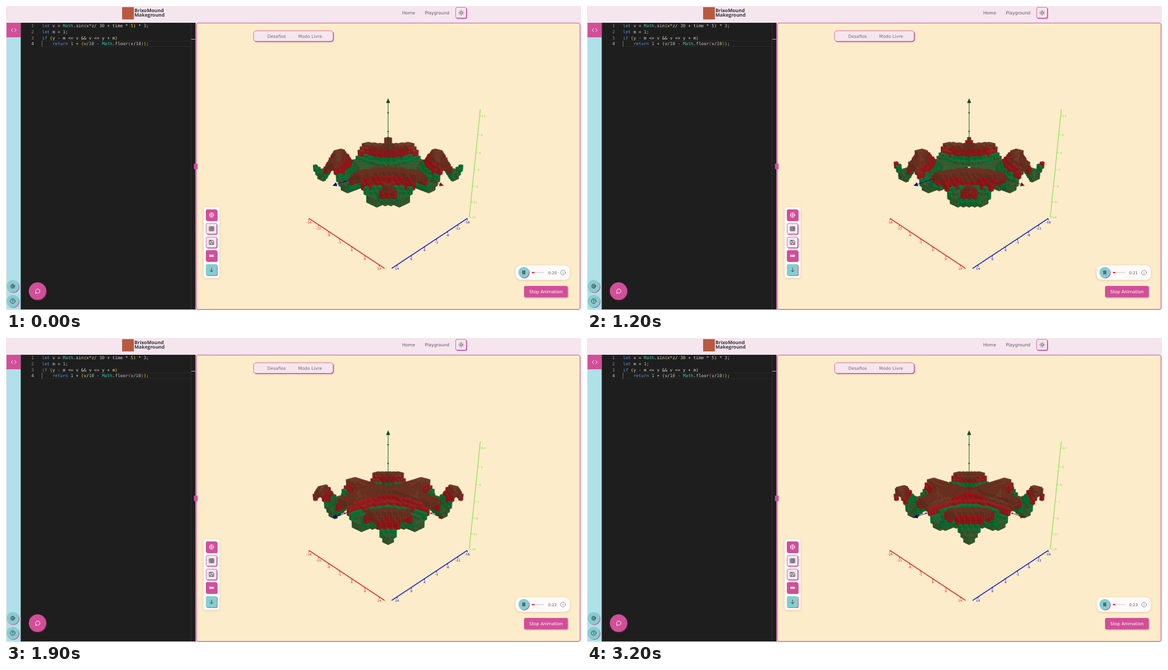
An HTML page with a canvas for the animation above (3.4 s loop, 1030 by 544 pixels).

```html
<!DOCTYPE html>
<html lang="pt">
<head>
<meta charset="utf-8">
<title>Voxel editor</title>
<style>
html, body { margin: 0; width: 100%; height: 100%; overflow: hidden; background: #f5e6ee; }
svg, canvas { position: absolute; left: 0; top: 0; width: 1030px; height: 544px; }
text { font: 7.8px "DejaVu Sans", sans-serif; fill: #5b5862; text-rendering: geometricPrecision; }
.code text { font: 7.76px "DejaVu Sans Mono", monospace; fill: #d4d4d4; white-space: pre; }
.code .num { fill: #858585; text-anchor: end; }
.code .on { fill: #c6c6c6; }
.k { fill: #569cd6; } .t { fill: #3dc9b0; } .n { fill: #b5cea8; } .g { fill: #ffd700; } .p { fill: #da70d6; }
.brand { font: bold 8.6px "Open Sans", sans-serif; fill: #35323c; }
.soft { filter: drop-shadow(0 1px 2px #0002); }
.pink { fill: #d14f98; } .teal { fill: #86cdd0; }
.box { fill: #f5e6ee; stroke: #d14f98; stroke-width: .8; }
.pop { filter: drop-shadow(1.3px 1.3px .6px #c9529a); }
.dark { filter: drop-shadow(1px 1px 1px #7a2d5a99); }
.icon { fill: none; stroke: #3a3640; stroke-width: .9; stroke-linecap: round; stroke-linejoin: round; }
.white { stroke: #fff; }
</style>
</head>
<body>
<svg viewBox="0 0 1030 544">
  <!-- header -->
  <rect x="208" y="2" width="21" height="22" fill="#b85a42"/>
  <text class="brand" x="230" y="11">BrixoMound</text>
  <text class="brand" x="230" y="19.3">Makeground</text>
  <text x="709.7" y="15.2">Home</text>
  <text x="750.3" y="15.2">Playground</text>
  <rect class="box pop" x="805.5" y="2.5" width="19" height="19" rx="2.5"/>
  <g class="icon"><circle cx="815.4" cy="12.2" r="2"/>
    <path d="M815.4 7.6v1M815.4 15.8v1M810.8 12.2h1M819 12.2h1M812.2 9l.7.7M818 14.8l.7.7M812.2 15.4l.7-.7M818 9.6l.7-.7"/></g>

  <!-- side rail -->
  <rect x="1" y="30" width="26" height="513" fill="#b0e0e8"/>
  <rect class="pink" x="1" y="30" width="25.4" height="26"/>
  <path class="icon white" d="M12 40.5l-2.8 2.7 2.8 2.7M15.5 40.5l2.8 2.7-2.8 2.7"/>
  <circle class="teal pop" cx="12" cy="501.5" r="11"/>
  <circle class="teal pop" cx="12" cy="528" r="11"/>
  <g class="icon"><circle cx="12" cy="501.5" r="1.4"/><circle cx="12" cy="501.5" r="3.2"/>
    <circle cx="12" cy="501.5" r="4" stroke-dasharray="1.2 1.94" stroke-linecap="butt"/>
    <circle cx="12" cy="528" r="4.2"/><path d="M10.8 527a1.25 1.25 0 1 1 1.7 1.1q-.5.2-.5.7M12 530.2v.1"/></g>

  <!-- editor -->
  <rect x="26.4" y="30" width="312.6" height="513" fill="#1e1e1e"/>
  <path d="M64 62.5h267M64 72.5h267" stroke="#292929"/>
  <path d="M331.5 31v512" stroke="#343434"/>
  <path d="M64.5 62v11" stroke="#707070"/>
  <path d="M332 59.5h7" stroke="#b8b8b8"/>
  <g class="code">
    <text class="num" x="50" y="38.4">1</text><text class="num" x="50" y="49">2</text>
    <text class="num" x="50" y="59.6">3</text><text class="num on" x="50" y="70.2">4</text>
    <text x="64.5" y="38.4"><tspan class="k">let</tspan> v = <tspan class="t">Math</tspan>.sin<tspan class="g">(</tspan>x*z/ <tspan class="n">30</tspan> + time * <tspan class="n">5</tspan><tspan class="g">)</tspan> * <tspan class="n">3</tspan>;</text>
    <text x="64.5" y="49"><tspan class="k">let</tspan> m = <tspan class="n">1</tspan>;</text>
    <text x="64.5" y="59.6"><tspan class="k">if</tspan> <tspan class="g">(</tspan>y - m &lt;= v &amp;&amp; v &lt;= y + m<tspan class="g">)</tspan></text>
    <text x="64.5" y="70.2">    <tspan class="k">return</tspan> <tspan class="n">1</tspan> + <tspan class="g">(</tspan>v/<tspan class="n">10</tspan> - <tspan class="t">Math</tspan>.floor<tspan class="p">(</tspan>v/<tspan class="n">10</tspan><tspan class="p">)</tspan><tspan class="g">)</tspan>;</text>
  </g>
  <circle class="pink dark" cx="56.5" cy="510.3" r="15.7"/>
  <path class="icon white" d="M53 514.2l.6-2.1a3.8 3.8 0 1 1 1.5 1.5z"/>

  <!-- scene panel -->
  <path d="M339.7 30v514" stroke="#d14f98" stroke-width="1.2"/>
  <rect x="341" y="30.5" width="687.3" height="512.6" rx="4" fill="#fdecc9" stroke="#d14f98" stroke-width="1.1"/>
  <rect class="pink" x="336.7" y="282" width="6.6" height="10" rx="1"/>
  <rect class="box pop" x="443.5" y="44.3" width="142.5" height="18.9" rx="4.5"/>
  <text x="468" y="56.7" style="fill:#716b75">Desafios</text>
  <text x="523.3" y="56.7" style="fill:#716b75">Modo Livre</text>

  <!-- tools -->
  <rect class="soft" x="354" y="360" width="28.5" height="126.5" rx="4" fill="#fffafa"/>
  <g class="pop">
    <rect class="pink" x="358" y="364" width="20" height="20" rx="2.5"/>
    <rect class="box" x="358.5" y="389" width="19" height="19" rx="2.5"/>
    <rect class="box" x="358.5" y="413.5" width="19" height="19" rx="2.5"/>
    <rect class="pink" x="358" y="437" width="20" height="20" rx="2.5"/>
    <rect class="teal" x="358" y="462" width="20" height="20" rx="2.5"/>
  </g>
  <g class="icon white"><circle cx="368.2" cy="374" r="3.9"/><path d="M364.3 374h7.8M368.2 370.1v7.8"/>
    <path d="M364.6 446h7.2M364.6 448h7.2" stroke-width="1.3"/></g>
  <path class="icon" d="M364.5 395h7.6v7.2h-7.6zM364.5 397.4h7.6M364.5 399.8h7.6M367 395v7.2M369.6 395v7.2M364.5 419.3h5.8l1.8 1.8v5.6h-7.6zM366.3 426.7v-3.2h4v3.2M366.3 419.3v2h3M368.2 468.6v7M365.4 473l2.8 2.8 2.8-2.8"/>

  <!-- player -->
  <rect class="soft" x="913" y="464" width="97" height="26" rx="9" fill="#fffafa"/>
  <circle class="teal pop" cx="927.5" cy="476.7" r="9.7"/>
  <path d="M925.4 473.8h1.5v6h-1.5zM928.2 473.8h1.5v6h-1.5z" fill="#607f86" stroke="#3a3640" stroke-width=".7"/>
  <path d="M942 477h22" stroke="#dcd6da" stroke-width="1.6"/>
  <path d="M942 477h4.5" stroke="#ee1c24" stroke-width="2"/>
  <text id="clock" x="971" y="479.6" style="font-size:7px">0:20</text>
  <g class="icon" style="stroke:#85818a"><circle cx="997.8" cy="477" r="4.3"/><path d="M997.8 476.8v2.2M997.8 474.9v.1"/></g>
  <rect class="pink dark" x="928" y="501" width="78" height="20" rx="2.5"/>
  <text x="937.2" y="514" style="fill:#fff">Stop Animation</text>
</svg>
<canvas id="scene" width="1030" height="544"></canvas>
<script>
const ctx = document.getElementById("scene").getContext("2d");
const clock = document.getElementById("clock");
const LOOP = 3400, HALF = 16, TICK = 5.59, TIP = 20.9, EDGE = 17.75, RAIL = 19;
const TILT_COS = 0.94, TILT_SIN = 0.341;
const RED = [150, 24, 26], GREEN = [8, 112, 50];
const X = { dir: [1, 0, 0], color: "#8c0f12" };
const Y = { dir: [0, 1, 0], color: "#0d4a24" };
const Z = { dir: [0, 0, 1], color: "#06068c" };
let phase = 0;

// Perspective view from the +x +y +z side
function project(x, y, z) {
  const side = (x - z) * Math.SQRT1_2, near = (x + z) * Math.SQRT1_2;
  const k = 549 / (95.4 - near * TILT_COS - y * TILT_SIN);
  return [684.5 + side * k, 287.5 + (near * TILT_SIN - y * TILT_COS) * k];
}

const along = (axis, d) => project(...axis.dir.map(c => c * d));

function line(a, b, color, width) {
  ctx.strokeStyle = color;
  ctx.lineWidth = width;
  ctx.beginPath();
  ctx.moveTo(...a);
  ctx.lineTo(...b);
  ctx.stroke();
}

function polygon(points, fill, edge) {
  ctx.beginPath();
  points.forEach(p => ctx.lineTo(...p));
  ctx.closePath();
  ctx.fillStyle = fill;
  ctx.fill();
  if (edge) {
    ctx.strokeStyle = edge;
    ctx.lineWidth = 0.4;
    ctx.stroke();
  }
}

function column(x, z) {
  const v = Math.sin(x * z / 30 + phase) * 3;
  return { v, lo: Math.ceil(v - 1), hi: Math.floor(v + 1) };
}

function solid(x, y, z) {
  if (x > HALF || z > HALF) return false;
  const c = column(x, z);
  return y >= c.lo && y <= c.hi;
}

// Four flat tones from red to green, each as [fill, edge] for top, left and right
function palette(mix) {
  const tone = k => `rgb(${RED.map((r, i) => Math.round((r + (GREEN[i] - r) * mix) * k))})`;
  return [1.04, 0.9, 0.98].map(k => [tone(k), tone(k * 0.84)]);
}
const TONES = [0, 0.3, 0.72, 1].map(palette);
const shades = v => TONES[Math.round((v / 10 - Math.floor(v / 10)) * 3)];

function drawColumn(x, z, { v, lo, hi }) {
  const [top, left, right] = shades(v);
  const x0 = x - .5, x1 = x + .5, z0 = z - .5, z1 = z + .5;
  for (let y = lo; y <= hi; y++) {
    const b = y - .5, t = y + .5;
    if (!solid(x, y, z + 1))
      polygon([project(x0, b, z1), project(x1, b, z1), project(x1, t, z1), project(x0, t, z1)], ...left);
    if (!solid(x + 1, y, z))
      polygon([project(x1, b, z0), project(x1, b, z1), project(x1, t, z1), project(x1, t, z0)], ...right);
    if (y === hi)
      polygon([project(x0, t, z0), project(x1, t, z0), project(x1, t, z1), project(x0, t, z1)], ...top);
  }
}

function drawAxis(axis, from, to) {
  line(along(axis, from), along(axis, to), axis.color, 0.9);
  for (let d = TICK; d < TIP - 1; d += TICK) {
    if (d < from || d >= to) continue;
    ctx.fillStyle = axis.color;
    ctx.beginPath();
    ctx.arc(...along(axis, d), 1.3, 0, 7);
    ctx.fill();
  }
}

function drawHead(axis) {
  const [ax, ay] = along(axis, TIP - 1.3), [bx, by] = along(axis, TIP);
  const k = 3.7 / Math.hypot(bx - ax, by - ay);
  const nx = (ay - by) * k, ny = (bx - ax) * k;
  polygon([[ax + nx, ay + ny], [bx, by], [ax - nx, ay - ny]], axis.color);
}

function drawOrigin() {
  const [x, y] = project(0, 0, 0);
  const glow = ctx.createRadialGradient(x, y + 1, 0, x, y + 1, 4);
  glow.addColorStop(0, "#e4fff0");
  glow.addColorStop(1, "#e4fff000");
  ctx.fillStyle = glow;
  ctx.fillRect(x - 4, y - .5, 8, 3);
}

// Column order runs from far to near, so axis pieces are hidden correctly
function drawVoxels() {
  for (let x = -HALF; x <= HALF; x++)
    for (let z = -HALF; z <= HALF; z++) {
      const c = column(x, z), pieces = [];
      if (z === 0 && x >= 0) pieces.push([X, x]);
      if (x === 0 && z >= 0) pieces.push([Z, z]);
      const axes = () => pieces.forEach(([a, d]) => drawAxis(a, Math.max(0, d - .5), d + .5));
      if (c.lo > 0) axes();
      drawColumn(x, z, c);
      if (c.hi < 0) axes();
      if (x === 0 && z === 0) {
        if (c.hi < 0) drawOrigin();
        drawAxis(Y, Math.max(0, c.hi + .5), TIP - 1);
        drawHead(Y);
      }
    }
  for (const a of [X, Z]) {
    drawAxis(a, HALF + .5, TIP - 1);
    drawHead(a);
  }
}

function drawRuler(at, color, dx, dy, tx, ty) {
  line(at(-EDGE), at(EDGE), color, 1.4);
  ctx.font = '5.6px "DejaVu Sans", sans-serif';
  ctx.textAlign = "center";
  for (let i = 0; i < 7; i++) {
    const [x, y] = at(-EDGE + i * TICK);
    line([x, y], [x + dx, y + dy], color, 0.9);
    ctx.fillStyle = color;
    ctx.fillText(i * 5 - 16, x + tx, y + ty);
  }
}

function draw(t) {
  phase = t / 200 - 0.885;
  ctx.clearRect(0, 0, 1030, 544);
  drawRuler(d => project(d, -EDGE, RAIL), "#f01414", 0, 3.5, 0, 8.5);
  drawRuler(d => project(RAIL, -EDGE, d), "#0a0ad2", 0, 3.5, 0, 8.5);
  drawRuler(d => project(RAIL, d, -RAIL), "#92e262", 3, 0, 7, 2.5);
  drawVoxels();
  clock.textContent = "0:" + (20 + (t >= 900) + (t >= 1900) + (t >= 2900));
}

// The picture steps every 100 ms, with two longer rests
function stepTime(ms) {
  const t = Math.floor(ms % LOOP / 100) * 100;
  if (t >= 2600 && t < 2900) return 2600;
  return t === 3000 ? 2900 : t;
}

const start = performance.now();
let last = -1;
function tick() {
  const t = stepTime(performance.now() - start);
  if (t !== last) draw(last = t);
  requestAnimationFrame(tick);
}
tick();
</script>
</body>
</html>
```
